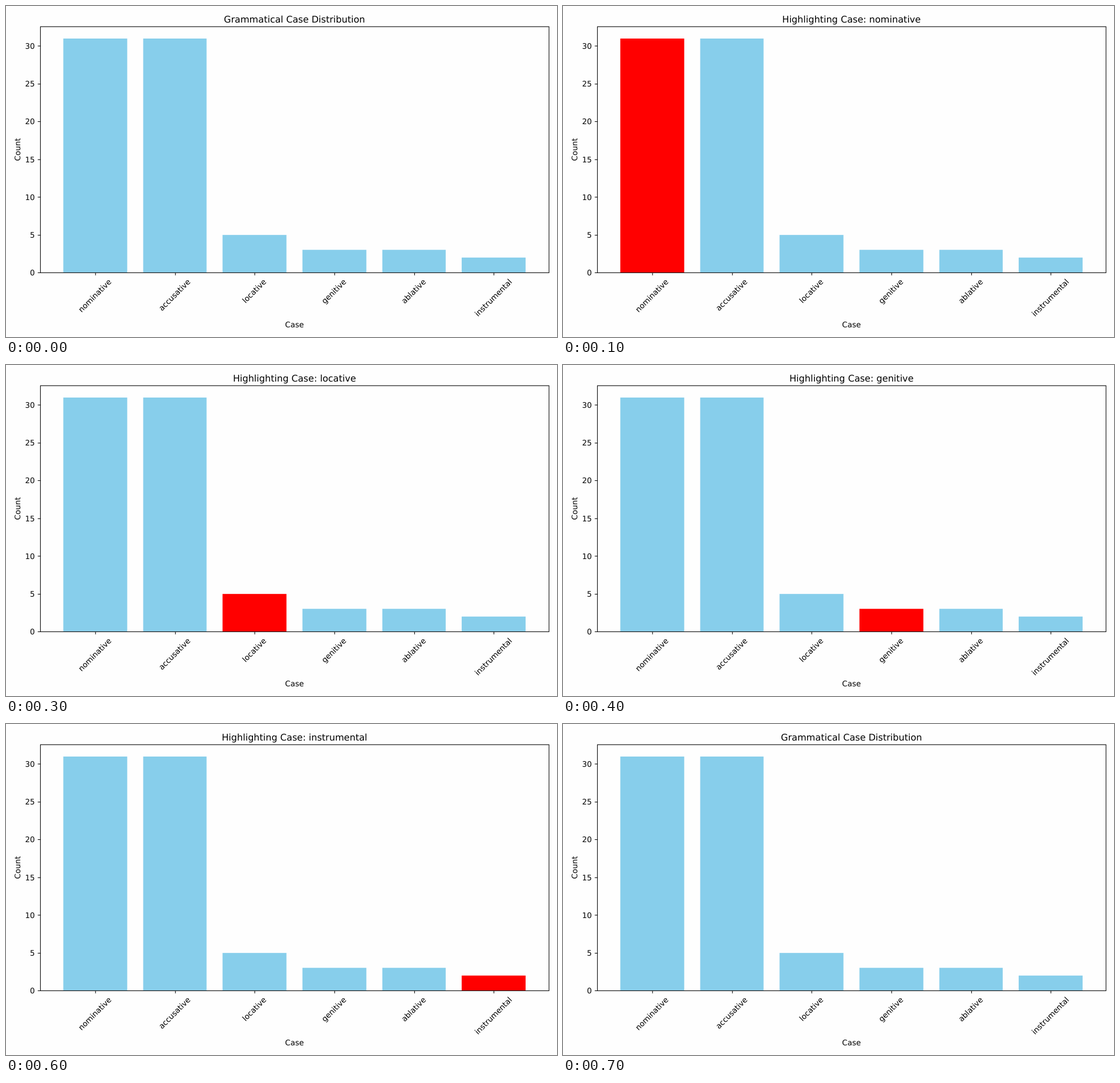
These frames come from a looping animation (966x580 px, 0.8 s). An HTML page with a canvas:

```html
<!DOCTYPE html>
<html lang="en">
<head>
<meta charset="utf-8">
<title>Grammatical Case Distribution</title>
<style>
  html, body { margin: 0; width: 100%; height: 100%; overflow: hidden; background: #fefefe; }
  canvas { display: block; }
</style>
</head>
<body>
<canvas id="chart" width="966" height="580"></canvas>
<script>
const ctx = document.getElementById('chart').getContext('2d');

// The chart is laid out on a 1000 x 600 figure and scaled to the stage
const FIG = { w: 1000, h: 600 };
const PT = 100 / 72;
const SMALL = 10 * PT, LARGE = 12 * PT;
const BOX = { left: 62.15, right: 985, top: 37.35, bottom: 483.05 };
const MID = { x: (BOX.left + BOX.right) / 2, y: (BOX.top + BOX.bottom) / 2 };
const TICK = 3.5 * PT;

const CASES = [
  ['nominative', 31], ['accusative', 31], ['locative', 5],
  ['genitive', 3], ['ablative', 3], ['instrumental', 2]
];
const STEP = 100, LOOP = 800;

// Bars are 0.8 wide, with a 5 % margin around the data
const UNIT_X = (BOX.right - BOX.left) / (5.8 * 1.1);
const UNIT_Y = (BOX.bottom - BOX.top) / (31 * 1.05);
const xOf = v => BOX.left + (v + 0.69) * UNIT_X;
const yOf = v => BOX.bottom - v * UNIT_Y;
const snap = v => Math.round(v) + 0.5;

function setFont(size) {
  ctx.font = `${size}px "DejaVu Sans", sans-serif`;
  ctx.textRendering = 'geometricPrecision';
}

function text(str, x, y, { size = SMALL, align = 'center', angle = 0, drop = 0 } = {}) {
  ctx.save();
  setFont(size);
  ctx.textAlign = align;
  ctx.fillStyle = '#000';
  ctx.translate(x, y);
  ctx.rotate(angle);
  ctx.fillText(str, 0, drop);
  ctx.restore();
}

// Slanted label whose bounding box hangs centred below its tick
function slanted(str, x) {
  setFont(SMALL);
  const half = (ctx.measureText(str).width + 14) / (2 * Math.SQRT2);
  text(str, x, BOX.bottom + 2 * TICK + 0.5 + half, { angle: -Math.PI / 4, drop: 3.8 });
}

function line(x1, y1, x2, y2) {
  ctx.beginPath();
  ctx.moveTo(x1, y1);
  ctx.lineTo(x2, y2);
  ctx.stroke();
}

function draw(active) {
  ctx.setTransform(966 / FIG.w, 0, 0, 580 / FIG.h, 0, 0);
  ctx.fillStyle = '#fefefe';
  ctx.fillRect(0, 0, FIG.w, FIG.h);

  CASES.forEach(([, count], i) => {
    const left = Math.round(xOf(i - 0.4)), right = Math.round(xOf(i + 0.4));
    const top = Math.round(yOf(count)), bottom = Math.round(BOX.bottom);
    ctx.fillStyle = i === active ? '#ff0000' : '#87ceeb';
    ctx.fillRect(left, top, right - left, bottom - top);
  });

  const left = snap(BOX.left), top = snap(BOX.top), bottom = snap(BOX.bottom);
  ctx.strokeStyle = '#000';
  ctx.lineWidth = 0.8 * PT;
  ctx.strokeRect(left, top, snap(BOX.right) - left, bottom - top);

  for (let v = 0; v <= 30; v += 5) {
    const y = snap(yOf(v));
    line(left - TICK, y, left, y);
    text(v, BOX.left - 2 * TICK, yOf(v) + 5.3, { align: 'right' });
  }
  CASES.forEach(([name], i) => {
    const x = snap(xOf(i));
    line(x, bottom, x, bottom + TICK);
    slanted(name, xOf(i));
  });

  text('Case', MID.x, 582.5);
  text('Count', 26, MID.y, { angle: -Math.PI / 2 });
  const name = CASES[active]?.[0];
  text(name ? `Highlighting Case: ${name}` : 'Grammatical Case Distribution',
    MID.x, 29.8, { size: LARGE });
}

function tick() {
  draw(Math.floor(performance.now() % LOOP / STEP) - 1);
  requestAnimationFrame(tick);
}
tick();
</script>
</body>
</html>
```
